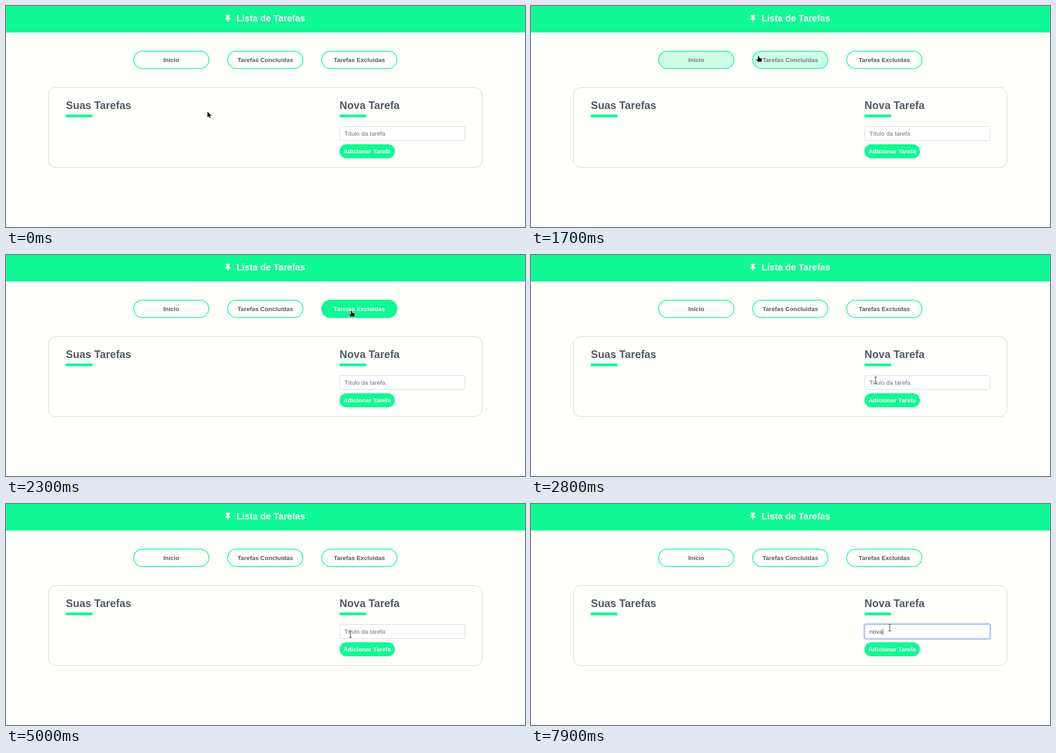
Write an HTML page with a canvas that moves like this. It is 1145 by 489 pixels and loops after 8 s.

```html
<!DOCTYPE html>
<html lang="pt-BR">
<head>
<meta charset="utf-8">
<title>Lista de Tarefas</title>
<style>
  html, body { margin: 0; width: 100%; height: 100%; overflow: hidden; background: #fffffb; }
  canvas { display: block; }
</style>
</head>
<body>
<canvas id="stage" width="1145" height="489"></canvas>
<script>
const ctx = document.getElementById('stage').getContext('2d');
const LOOP = 8000, STEP = 100;
const GREEN = '#11f994', PAPER = '#fffffb', INK = [82, 91, 101];
const FONT = '"Liberation Sans", Arial, sans-serif';

// Pointer keys: time, x, y, shape
const PATH = [
  [0, 444, 233, 'arrow'], [800, 459, 212, 'arrow'], [900, 473, 178, 'arrow'],
  [1000, 438, 126, 'hand'], [1100, 416, 110, 'hand'], [1200, 412, 112, 'hand'],
  [1600, 455, 114, 'arrow'], [1700, 502, 111, 'hand'], [1800, 542, 108, 'hand'],
  [1900, 569, 107, 'hand'], [2000, 628, 110, 'hand'], [2100, 702, 116, 'hand'],
  [2200, 740, 121, 'hand'], [2300, 762, 124, 'hand'], [2400, 765, 125, 'hand'],
  [2500, 767, 143, 'arrow'], [2600, 766, 186, 'arrow'], [2700, 763, 232, 'arrow'],
  [2800, 760, 277, 'beam'], [2900, 759, 288, 'beam'],
  [4600, 763, 292, 'beam'], [4700, 766, 295, 'beam'],
  [4900, 762, 291, 'beam'], [5000, 759, 288, 'beam'],
  [5300, 775, 281, 'beam'], [5400, 791, 274, 'beam'], [5700, 791, 273.5, 'beam']
];

// Tabs: label, centre x, hover start, hover end
const TABS = [
  ['Início', 364.6, 900, 1500],
  ['Tarefas Concluídas', 572, 1650, 2050],
  ['Tarefas Excluídas', 779.5, 2050, 2400]
];

const CARET_ON = [[3300, 3800], [4600, 4900], [6000, 6500], [7100, LOOP]];
const TYPED = [[7400, 'n'], [7600, 'no'], [7800, 'nov'], [7900, 'nova']];

const clamp = v => Math.max(0, Math.min(1, v));
const mix = (a, b, k) => `rgb(${a.map((v, i) => Math.round(v + (b[i] - v) * k))})`;
const latest = (keys, t) => keys.filter(k => k[0] <= t).pop();

function box(x, y, w, h, r, fill, stroke, line = 1) {
  ctx.beginPath();
  ctx.roundRect(x, y, w, h, r);
  if (fill) { ctx.fillStyle = fill; ctx.fill(); }
  if (stroke) { ctx.strokeStyle = stroke; ctx.lineWidth = line; ctx.stroke(); }
}

function text(str, x, y, size, color, bold = true, align = 'left') {
  ctx.font = `${bold ? 'bold ' : ''}${size}px ${FONT}`;
  ctx.textAlign = align;
  ctx.fillStyle = color;
  ctx.fillText(str, x, y);
}

function pin() {
  ctx.save();
  ctx.translate(483.6, 19.6);
  ctx.scale(0.0303, 0.0303);
  ctx.fillStyle = PAPER;
  ctx.beginPath();
  ctx.roundRect(32, 0, 320, 96, 24);
  ctx.fill();
  ctx.fill(new Path2D('M98 90H286L298 214Q384 256 384 328Q384 352 360 352H224V456L192 512L160 456V352H24Q0 352 0 328Q0 256 86 214Z'));
  ctx.restore();
}

function tab([label, cx, from, to], t) {
  const k = t < to ? clamp((t - from) / 250) : 1 - clamp((t - to) / 250);
  ctx.globalAlpha = k;
  if (k) box(cx - 83.8, 99, 167.6, 40.2, 20, GREEN);
  ctx.globalAlpha = 1;
  box(cx - 83, 99.8, 166, 38.6, 19.3, null, GREEN, 1.7);
  text(label, cx, 123.7, 13.41, mix(INK, [255, 255, 251], k), true, 'center');
}

function heading(label, x) {
  text(label, x, 228, 23.47, mix(INK, INK, 0));
  ctx.fillStyle = GREEN;
  ctx.fillRect(x, 240.2, 58.8, 6);
}

function focusLevel(t) {
  if (t < 4900) return clamp((t - 3200) / 400);
  if (t < 6000) return clamp((5000 - t) / 200);
  return clamp((t - 5900) / 300);
}

function field(t) {
  const k = focusLevel(t);
  ctx.globalAlpha = k;
  if (k) box(733.3, 263.6, 281.9, 37, 5.5, '#bfcffc');
  ctx.globalAlpha = 1;
  box(736.3, 266.5, 276, 31.3, 3, '#fff', mix([206, 212, 218], [134, 160, 233], k));

  const typed = latest(TYPED, t);
  const str = typed ? typed[1] : '';
  text(str || 'Título da tarefa', 746.6, 287, 13.41, str ? '#495057' : '#6c757d', false);
  if (CARET_ON.some(([a, b]) => t >= a && t < b)) {
    const w = str ? ctx.measureText(str).width : 0;
    ctx.fillStyle = '#495057';
    ctx.fillRect(Math.round(747 + w), 275.5, 1, 14.5);
  }
}

const outlined = (d, line) => {
  const p = new Path2D(d);
  ctx.strokeStyle = '#fff';
  ctx.lineWidth = line;
  ctx.stroke(p);
  ctx.fillStyle = '#000';
  ctx.fill(p);
};

const POINTERS = {
  arrow() {
    outlined('M.5 .8V13.2L3.3 10.6L5.4 15.2L7.4 14.3L5.4 9.8H9.2Z', 1.4);
  },
  hand() {
    outlined('M-1.2 .2Q0 -1 1 .2L1.6 4L6 4.8Q7 5 7 6.5V9.5L6 13H-1.5L-2.2 11L-4.8 8Q-5 6.4 -3.4 6.6L-1 8Z', 1.5);
    ctx.fillStyle = '#fff';
    ctx.fillRect(-1, 11.2, 6, 0.8);
  },
  beam() {
    const p = new Path2D('M-2.6 -7.3H-1L.5 -6.5L2 -7.3H3.6M.5 -6.5V6.7M-2.6 7.5H-1L.5 6.7L2 7.5H3.6');
    for (const [color, line] of [['rgba(255,255,255,.8)', 2.4], ['#222', 1.1]]) {
      ctx.strokeStyle = color;
      ctx.lineWidth = line;
      ctx.stroke(p);
    }
  }
};

function pointer(t) {
  const [, x, y, shape] = latest(PATH, t);
  ctx.save();
  ctx.translate(x, y);
  ctx.lineJoin = 'round';
  POINTERS[shape]();
  ctx.restore();
}

function draw(t) {
  ctx.fillStyle = PAPER;
  ctx.fillRect(0, 0, 1145, 489);
  ctx.fillStyle = GREEN;
  ctx.fillRect(0, 0, 1145, 58.6);
  pin();
  text('Lista de Tarefas', 508.6, 33.8, 20.12, PAPER);

  TABS.forEach(item => tab(item, t));

  box(93.5, 180.5, 957, 177, 16.8, null, '#cdd0cb');
  heading('Suas Tarefas', 132);
  heading('Nova Tarefa', 735.8);
  field(t);
  box(735.8, 306, 122.2, 31, 15.5, GREEN);
  text('Adicionar Tarefa', 796.8, 326.2, 13.41, PAPER, true, 'center');
  pointer(t);
}

const start = performance.now();
function tick() {
  const t = (performance.now() - start) % LOOP;
  draw(Math.floor(t / STEP) * STEP);
  requestAnimationFrame(tick);
}
tick();
</script>
</body>
</html>
```
